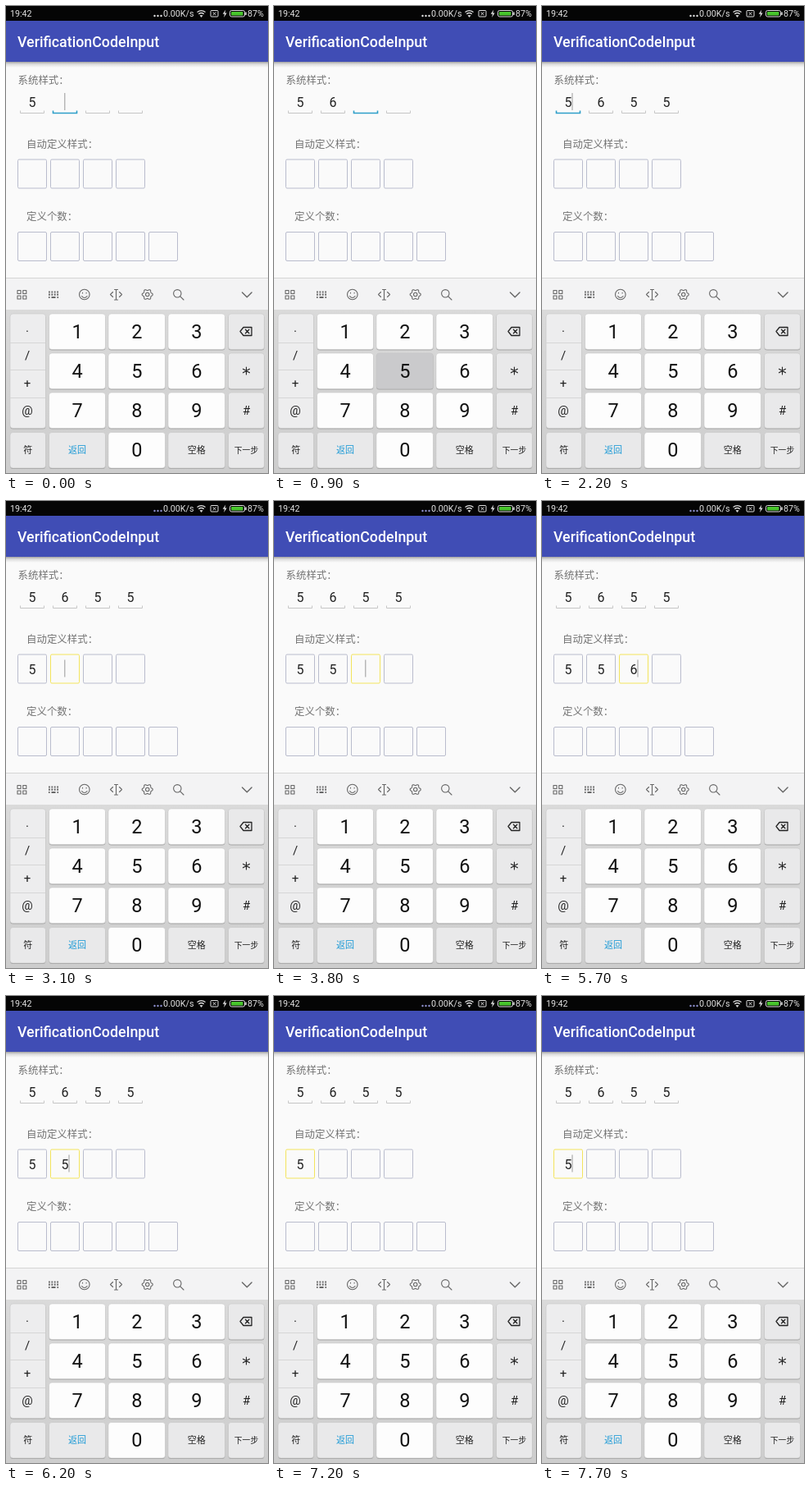
Recreate the animation shown at these times as an HTML page. Size 320 by 569 pixels, loop 8000 ms.

```html
<!DOCTYPE html>
<html lang="zh-CN">
<head>
<meta charset="utf-8">
<style>
html, body { margin: 0; width: 100%; height: 100%; overflow: hidden; background: #fafafa; }
svg { display: block; width: 100%; height: 100%; }
text { font-family: Roboto, "Noto Sans CJK SC", sans-serif; }
.mid { text-anchor: middle; }
.line { fill: none; stroke: #666; stroke-width: 1.1; stroke-linecap: round; stroke-linejoin: round; }
</style>
</head>
<body>
<svg id="stage" viewBox="0 0 320 569">
  <defs>
    <linearGradient id="shade" x2="0" y2="1"><stop stop-color="#a2a2a2"/><stop offset=".4" stop-color="#dcdcdc"/><stop offset="1" stop-color="#fafafa"/></linearGradient>
    <linearGradient id="board" x2="0" y2="1"><stop stop-color="#dadada"/><stop offset="1" stop-color="#cdcdcd"/></linearGradient>
  </defs>
  <rect width="320" height="569" fill="#fafafa"/>
  <rect width="320" height="18" fill="#050505"/>
  <rect y="18" width="320" height="50" fill="#404db5"/>
  <rect y="68" width="320" height="7" fill="url(#shade)"/>
  <g font-size="10.7" fill="#e4e4e4">
    <text x="5" y="13">19:42</text>
    <text x="192" y="13" textLength="">0.00K/s</text>
    <text x="295" y="13">87%</text>
  </g>
  <g id="dots"><circle cx="181.5" cy="12" r="1.2"/><circle cx="185.5" cy="12" r="1.2"/><circle cx="189.5" cy="12" r="1.2"/></g>
  <g fill="none" stroke="#ddd">
    <path d="M233.5 7.6Q238.500 3.600 243.500 7.600M235.200 9.800Q238.500 7.200 241.800 9.800" stroke-width="1.3"/>
    <path d="M237 11.500H240L238.500 13.500Z" fill="#ddd" stroke-width=".7"/>
    <rect x="250" y="5.500" width="9" height="7.500" rx="1"/>
    <path d="M252.700 7.500L256.300 11.100M256.300 7.500L252.700 11.100"/>
    <rect x="273.500" y="5.500" width="18" height="7.500" rx="2"/>
    <path d="M293 7.500V11" stroke-width="1.500"/>
  </g>
  <path d="M268.200 4.500L264.700 9.800H267L266 14L269.700 8.500H267.400Z" fill="#ddd"/>
  <rect x="275" y="7" width="14.500" height="4.500" rx=".8" fill="#48c52c"/>
  <text x="14" y="50" font-size="17.78" font-weight="500" fill="#fff">VerificationCodeInput</text>
  <g font-size="12.44" fill="#737373">
    <text x="14.500" y="95">系统样式：</text>
    <text x="25" y="172.500">自动定义样式：</text>
    <text x="25" y="260.500">定义个数：</text>
  </g>
  <g id="fields"></g>
  <rect y="331" width="320" height="39" fill="#f3f3f4"/>
  <path d="M0 331.500H320" stroke="#d5d5d5"/>
  <rect y="370" width="320" height="199" fill="url(#board)"/>
  <g class="line">
    <path d="M14 346.500h4v4h-4zM20.800 346.500h4v4h-4zM14 353h4v4h-4zM20.800 353h4v4h-4z"/>
    <path d="M52 348.500H64M52 351.700H64" stroke-width="2.200" stroke-dasharray="1.800 1.600" stroke-linecap="butt"/>
    <path d="M52 355H53.500M55.500 355H60.500M62.500 355H64" stroke-width="2" stroke-linecap="butt"/>
    <circle cx="95.800" cy="351.500" r="6.300"/>
    <path d="M92.500 353.500Q95.800 357.500 99.100 353.500M93.500 349.300v.6M98.100 349.300v.6"/>
    <path d="M130.500 348.500L127.500 351.500L130.500 354.500M138.500 348.500L141.500 351.500L138.500 354.500M134.500 346V357.500M132.500 345.500H136.500M132.500 358H136.500"/>
    <path id="gear"/>
    <circle cx="172.700" cy="351.500" r="2.200"/>
    <circle cx="209.300" cy="350.300" r="4.700"/>
    <path d="M212.800 353.800L217 358"/>
    <path d="M288.500 349L294.300 354.800L300.100 349" stroke-width="1.400"/>
  </g>
  <g id="keys"></g>
</svg>
<script>
const $ = id => document.getElementById(id);
const box = (x, y, w, h, r, fill, more = '') =>
  `<rect x="${x}" y="${y}" width="${w}" height="${h}" rx="${r}" fill="${fill}" ${more}/>`;
const label = (s, x, y, size, fill = '#222') =>
  `<text class="mid" x="${x}" y="${y}" font-size="${size}" fill="${fill}">${s}</text>`;

// Time, typed digits per row, focused row and cell
const states = [
  [0, '5', '', 0, 1], [300, '56', '', 0, 2], [1000, '565', '', 0, 3], [2100, '5655', '', 0, 0],
  [2700, '5655', '', 1, 0], [3100, '5655', '5', 1, 1], [3700, '5655', '55', 1, 2],
  [4800, '5655', '556', 1, 3], [5600, '5655', '556', 1, 2], [6100, '5655', '55', 1, 1],
  [6700, '5655', '5', 1, 0]
];
// Key, press start, press end
const presses = [
  ['6', 100, 300], ['5', 900, 1000], ['5', 2000, 2100], ['5', 3000, 3100], ['5', 3600, 3700],
  ['6', 4600, 4800], ['del', 5500, 5600], ['del', 6000, 6100], ['del', 6600, 6700]
];

const cols = [[5, 43.5], [52.5, 69], [125, 69.5], [198, 69.5], [271.5, 44]];
const rows = [375, 423, 471, 519.5];
const layout = [['', '1', '2', '3', 'del'], ['', '4', '5', '6', '*'], ['', '7', '8', '9', '#'], ['符', '返回', '0', '空格', '下一步']];

function drawKey(name, col, row, down) {
  const [x, w] = cols[col], y = rows[row], mid = x + w / 2, cy = y + 21.5;
  const digit = /\d/.test(name);
  const fill = down ? '#cacacc' : digit ? '#fdfdfd' : '#e9e9ea';
  let s = box(x, y + 1, w, 43.5, 3.5, '#a5a5a5') + box(x, y, w, 43.5, 3.5, fill, 'stroke="#c2c2c2" stroke-width=".5"');
  if (digit) s += label(name, mid, cy + 8.3, 23.5, '#111');
  else if (name === 'del') s += `<path class="line" style="stroke:#222;stroke-width:1.3" d="M286 ${cy}l4-5h10v10h-10zM292.500 ${cy - 2.2}l4.400 4.400m0-4.400l-4.400 4.400"/>`;
  else if (name === '*') s += `<path class="line" style="stroke:#222" d="M293.500 ${cy - 4.5}v9m-4-6.700l8 4.500m0-4.500l-8 4.500"/>`;
  else if (name === '#') s += label(name, mid, cy + 5.5, 15);
  else s += label(name, mid, cy + 4.3, name.length > 2 ? 9.8 : 11, name === '返回' ? '#1c9ad6' : '#222');
  return s;
}

function drawKeys(down) {
  let s = box(5, 376, 43.5, 139.5, 3.5, '#a5a5a5') + box(5, 375, 43.5, 139.5, 3.5, '#ededee', 'stroke="#c2c2c2" stroke-width=".5"');
  s += '<path d="M5 410.500H48M5 443.500H48M5 477.500H48" stroke="#d6d6d6"/>';
  ['·', '/', '+', '@'].forEach((c, i) => s += label(c, 26, [402, 431, 465, 498][i], 15));
  layout.forEach((line, r) => line.forEach((name, c) => { if (name) s += drawKey(name, c, r, name === down); }));
  return s;
}

function drawRow(text, row, count, focus, caret) {
  let s = '';
  for (let i = 0; i < count; i++) {
    const x = 14 + i * 40, on = i === focus, digit = text[i] || '';
    if (row === 0) {
      s += `<path fill="none" stroke="${on ? '#2e9fc9' : '#c6c6c6'}" stroke-width="${on ? 1.6 : 1}" d="M${x + 3.5} 127.500V130.500H${x + 32.5}V127.500"/>`;
    } else {
      s += box(x + .5, row === 1 ? 187 : 275.5, 35, 35, 1.5, '#fafafa', `stroke="${on ? '#f3e45c' : '#b9bccd'}"`);
    }
    const base = row === 0 ? 123 : 210.5;
    s += label(digit, x + 18, base, 16);
    if (on && caret) s += box(digit ? x + 22.5 : x + 17.3, base - 17, 1, 21, 0, '#999');
  }
  return s;
}

// Six rounded teeth around the hub
let gear = '';
for (let i = 0; i <= 72; i++) {
  const a = i * Math.PI / 36, r = 5.7 + .8 * Math.cos(6 * a);
  gear += `${i ? 'L' : 'M'}${172.7 + r * Math.cos(a)} ${351.5 + r * Math.sin(a)}`;
}
$('gear').setAttribute('d', gear);

let last = '';
function frame(now) {
  const t = now % 8000;
  const [start, first, second, row, cell] = states.findLast(s => s[0] <= t);
  const caret = Math.floor((t - start) / 500) % 2 === 0;
  const press = presses.find(p => t >= p[1] && t < p[2]);
  const down = press ? press[0] : '';
  const look = [start, caret, down, t >= 2600].join();
  if (look !== last) {
    last = look;
    $('dots').setAttribute('fill', t < 2600 ? '#e4e4e4' : '#8f91cf');
    $('fields').innerHTML = drawRow(first, 0, 4, row === 0 ? cell : -1, caret) +
      drawRow(second, 1, 4, row === 1 ? cell : -1, caret) + drawRow('', 2, 5, -1, false);
    $('keys').innerHTML = drawKeys(down);
  }
  requestAnimationFrame(frame);
}
requestAnimationFrame(frame);
</script>
</body>
</html>
```
